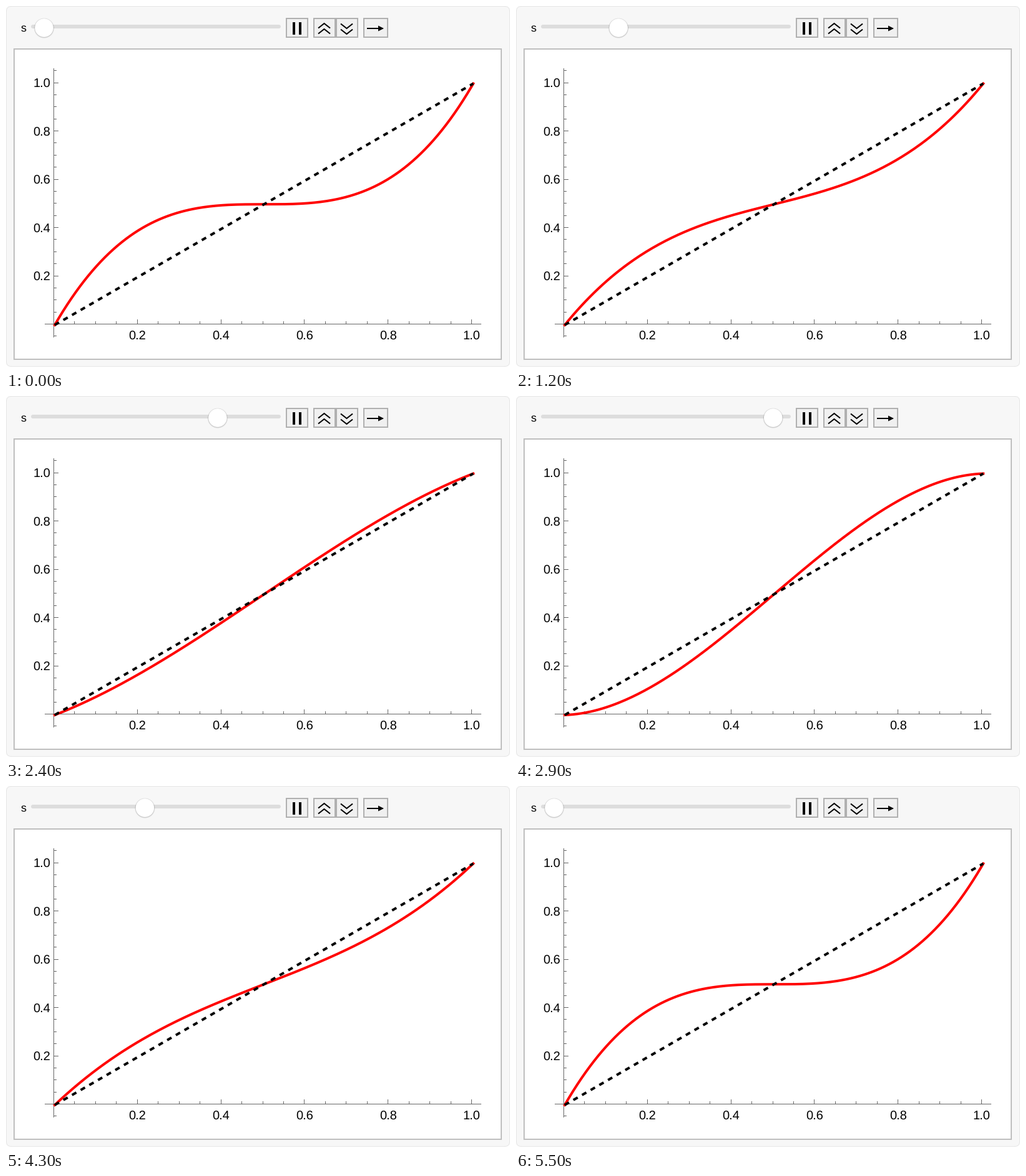
Animation of 807 by 581 pixels, one loop 6000 ms. Source, as a matplotlib script:

```python
import numpy as np
import matplotlib.pyplot as plt
from matplotlib.animation import FuncAnimation
from matplotlib.patches import Circle, FancyBboxPatch, Polygon, Rectangle

W, H, DPI = 807, 581, 64
PT = 72 / DPI          # points per pixel
FRAMES, INTERVAL = 60, 100

plt.rcParams["font.family"] = "Liberation Sans"
plt.rcParams["text.hinting"] = "none"
fig = plt.figure(figsize=(W / DPI, H / DPI), dpi=DPI, facecolor="white")
ax = fig.add_axes([0, 0, 1, 1])
ax.set_xlim(0, W)
ax.set_ylim(H, 0)
ax.axis("off")


def line(xs, ys, color="black", width=2, z=3, **kw):
    kw.setdefault("solid_capstyle", "butt")
    return ax.plot(xs, ys, color=color, lw=width * PT, zorder=z,
                   snap=False, **kw)[0]


def box(x0, y0, x1, y1, face, edge, width):
    """Rectangle whose border lies inside the given outer edges."""
    h = width / 2
    ax.add_patch(Rectangle((x0 + h, y0 + h), x1 - x0 - width, y1 - y0 - width,
                           fc=face, ec=edge, lw=width * PT, zorder=2,
                           joinstyle="miter"))


def label(x, y, text, size=20, ha="center"):
    ax.text(x, y, text, fontsize=size * PT, ha=ha, va="baseline",
            color="black", zorder=4)


def draw_panel():
    ax.add_patch(FancyBboxPatch((0.5, 0.5), W - 1, 578,
                                boxstyle="round,pad=0,rounding_size=8",
                                fc="#f7f7f7", ec="#e6e6e6", lw=PT, zorder=1))
    box(12, 68, 794, 568, "white", "#bfbfbf", 2)
    label(23, 41, "s", 18, "left")
    line([43, 437], [33, 33], "#dddddd", 6, solid_capstyle="round")


def draw_buttons():
    for x0, x1 in ((448, 484), (492, 528), (528, 564), (572, 612)):
        box(x0, 19, x1, 51, "#f0f0f0", "#b0b0b0", 2)
    for x in (461, 471):
        line([x, x], [26, 46], width=4)
    for y in (35.5, 44.5):
        line([500, 509.5, 519], [y, y - 7.5, y], solid_joinstyle="miter")
    for y in (28.5, 37.5):
        line([536, 545.5, 555], [y, y + 7.5, y], solid_joinstyle="miter")
    line([578, 598], [36, 36])
    ax.add_patch(Polygon([(605, 36), (596, 31.5), (596, 40.5)],
                         fc="black", lw=0, zorder=3))


def draw_axes():
    gray = "#666666"
    line([62, 761], [510.5, 510.5], gray, 1)
    line([76.5, 76.5], [100, 532], gray, 1)
    for k in range(-1, 22):
        v = k / 20
        size = 7 if k % 4 == 0 else 4
        x, y = 76.5 + 669 * v, 510.5 - 387.5 * v
        px, py = np.floor([x, y]) + 0.5
        line([77, 77 + size], [py, py], gray, 1)
        if 0 < k < 21:
            line([px, px], [510, 510 - size], gray, 1)
        if k > 0 and k % 4 == 0:
            label(x, 536, f"{v:.1f}")
            label(71, y + 8, f"{v:.1f}", ha="right")


def to_px(x, y):
    return 78 + 670.2 * x, 512 - 387.5 * y


def slider_value(n):
    """Hold at 0, rise to 1 and fall back, mirrored about the loop's middle."""
    phase = min(n, FRAMES - 1 - n) / (FRAMES - 1)
    return max(0.0, (phase - 1 / 12) / (5 / 12))


u = np.linspace(0, 1, 201)
bulge = 0.5 + 4 * (u - 0.5) ** 3 - u

draw_panel()
draw_buttons()
draw_axes()
curve = line([], [], "red", 4, z=5, solid_joinstyle="round",
             solid_capstyle="projecting")
line(*to_px(np.array([0, 1]), np.array([0, 1])), width=4, z=6,
     dashes=(2, 2), dash_capstyle="butt")

# Knob: soft shadow rings below a white disc
knob = [Circle((61, 35 + dy), r, fc="black", lw=0, alpha=a, zorder=7)
        for r, dy, a in ((16.4, 0.6, 0.03), (15.8, 0.5, 0.06),
                         (15.3, 0.4, 0.12))]
knob.append(Circle((61, 35), 14.8, fc="white", lw=0, zorder=8))
for disc in knob:
    ax.add_patch(disc)


def update(n):
    s = slider_value(n)
    curve.set_data(*to_px(u, u + (1 - 1.5 * s) * bulge))
    for disc in knob:
        disc.set_center((61 + 358 * s, disc.center[1]))
    return [curve, *knob]


anim = FuncAnimation(fig, update, frames=FRAMES, interval=INTERVAL,
                     init_func=lambda: update(0), repeat=True,
                     repeat_delay=0, blit=False)
plt.show()
```
